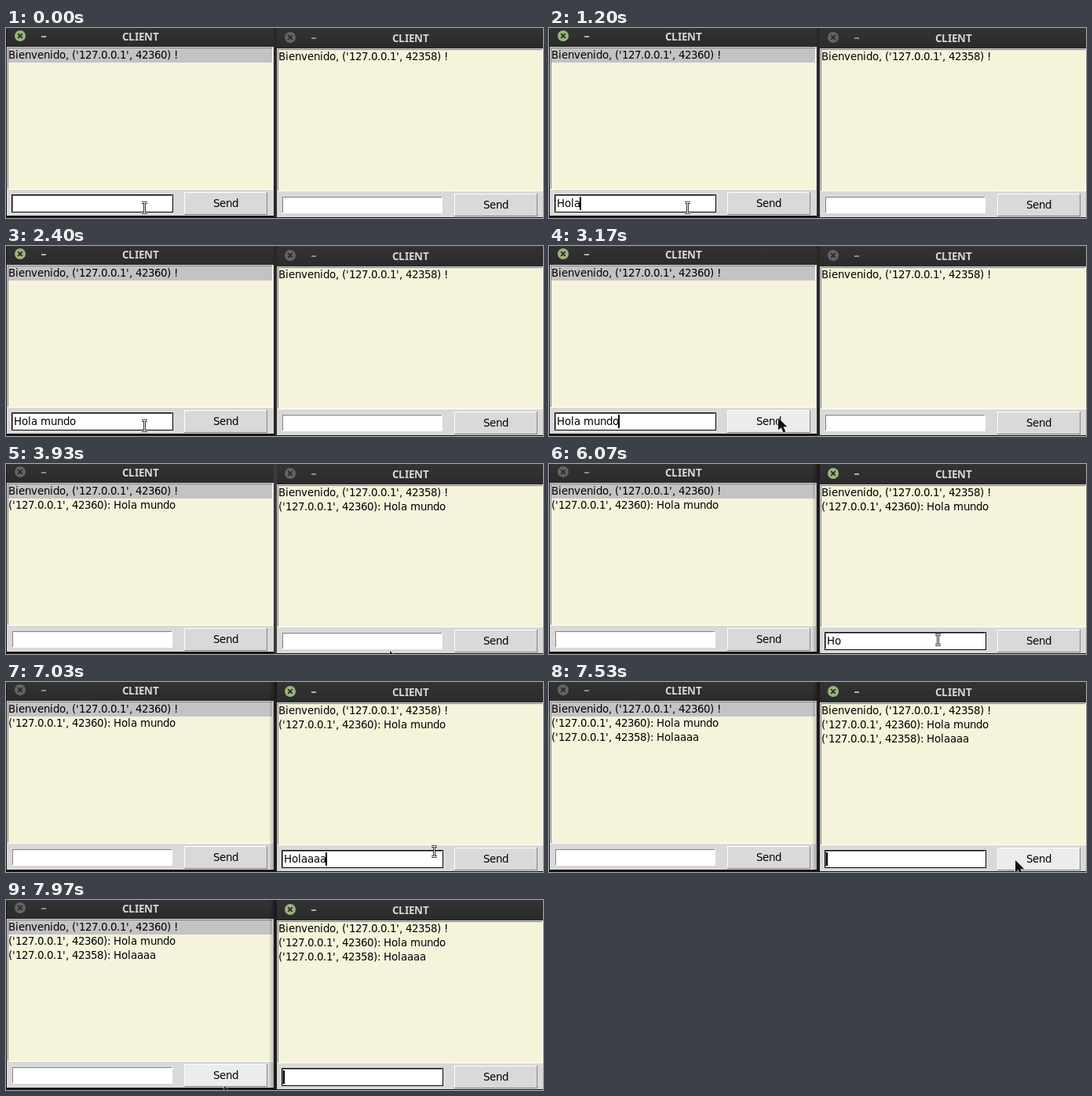
Write an HTML page that moves like this. It is 684 by 242 pixels and loops after 8 s.

```html
<!DOCTYPE html>
<html lang="es">
<head>
<meta charset="utf-8">
<title>Chat clients</title>
<style>
html, body { margin: 0; width: 100%; height: 100%; overflow: hidden; background: #161414; }
svg { display: block; }
text { font: 13.333px "DejaVu Sans", sans-serif; white-space: pre; fill: #000; }
.title { font: bold 13.333px "Noto Sans", sans-serif; fill: #d6d6d6; }
rect { shape-rendering: crispEdges; }
</style>
</head>
<body>
<svg id="stage" width="684" height="242" viewBox="0 0 684 242">
  <defs>
    <linearGradient id="bar" x1="0" y1="0" x2="0" y2="1">
      <stop offset="0" stop-color="#343434"/><stop offset="1" stop-color="#2b2b2b"/>
    </linearGradient>
    <linearGradient id="shade">
      <stop offset="0" stop-color="#000" stop-opacity="0"/><stop offset="1" stop-color="#000" stop-opacity=".4"/>
    </linearGradient>
  </defs>
</svg>
<script>
const LOOP = 8000;
const PLAIN = '13.333px "DejaVu Sans", sans-serif';
const BOLD = 'bold 13.333px "Noto Sans", sans-serif';
const FRAME = '#d9d9d9', DARK = '#828282', LIGHT = '#ffffff';
const ENTRY = [7, 212, 206, 23], BUTTON = [227, 209, 106, 29], LIST = [2, 25, 338, 181];

const stage = document.getElementById('stage');
const pen = document.createElement('canvas').getContext('2d');

function set(el, attrs) {
  for (const k in attrs) el.setAttribute(k, attrs[k]);
}
function add(parent, tag, attrs = {}) {
  const el = document.createElementNS('http://www.w3.org/2000/svg', tag);
  set(el, attrs);
  return parent.appendChild(el);
}
const box = (parent, [x, y, width, height], fill) => add(parent, 'rect', { x, y, width, height, fill });
const show = (el, on) => set(el, { visibility: on ? 'visible' : 'hidden' });
const inset = ([x, y, w, h], d = 1) => [x + d, y + d, w - 2 * d, h - 2 * d];
const inside = (px, py, [x, y, w, h]) => px >= x && px < x + w && py >= y && py < y + h;

// Whole-pixel advances, as the toolkit lays out its text
function steps(s, font) {
  pen.font = font;
  return [...s].map(ch => Math.round(pen.measureText(ch).width));
}
function write(el, s, x, font = PLAIN) {
  el.textContent = s;
  const xs = [x];
  for (const w of steps(s, font)) xs.push(x += w);
  set(el, { x: xs.slice(0, -1).join(' ') });
  return x;
}
function label(parent, s, x, y) {
  const el = add(parent, 'text', { y });
  write(el, s, x);
  return el;
}

// Panel with a two-tone edge; the returned function recolours it
function panel(parent, [x, y, w, h], fill) {
  const face = box(parent, [x, y, w, h], fill);
  const a = [box(parent, [x, y, w, 1]), box(parent, [x, y, 1, h])];
  const b = [box(parent, [x, y + h - 1, w, 1]), box(parent, [x + w - 1, y, 1, h])];
  return (fill, raised) => {
    set(face, { fill });
    a.forEach(r => set(r, { fill: raised ? LIGHT : DARK }));
    b.forEach(r => set(r, { fill: raised ? DARK : LIGHT }));
  };
}

function makeWindow(dx, dy, port, selected) {
  const g = add(stage, 'g', { transform: `translate(${dx} ${dy})` });
  box(g, [1, -4, 340, 28], 'url(#bar)');
  const close = add(g, 'circle', { cx: 18, cy: 10, r: 7 });
  add(g, 'path', { d: 'M15.2 7.2l5.6 5.6m0-5.6l-5.6 5.6', stroke: '#2b2b2b', 'stroke-width': 1.9 });
  const dash = box(g, [45, 10, 6, 2]);
  write(add(g, 'text', { class: 'title', y: 16 }), 'CLIENT', 148, BOLD);

  box(g, [1, 24, 340, 215], FRAME);
  panel(g, LIST)('#f5f3da', false);
  if (selected) box(g, [3, 26, 336, 18], '#c3c3c3');
  const lines = [
    `Bienvenido, ('127.0.0.1', ${port}) !`,
    "('127.0.0.1', 42360): Hola mundo",
    "('127.0.0.1', 42358): Holaaaa"
  ].map((s, i) => label(g, s, 3, 39 + 18 * i));

  const ring = box(g, ENTRY, '#000');
  panel(g, inset(ENTRY))('#fff', false);
  const typed = add(g, 'text', { y: 228 });
  const caret = box(g, [9, 215, 2, 17], '#000');

  const button = panel(g, BUTTON);
  const send = label(g, 'Send', 264, 228);

  return {
    over: (x, y, area) => inside(x - dx, y - dy, area),
    draw(s) {
      set(close, { fill: s.active ? '#9bb57c' : '#646464' });
      set(dash, { fill: s.active ? '#b0b0b0' : '#8c8c8c' });
      lines.forEach((el, i) => show(el, i <= s.count));
      show(ring, s.active);
      set(caret, { x: write(typed, s.text, 10) - 1 });
      show(caret, s.active && s.caret);
      button(s.hover ? '#ececec' : FRAME, !s.down);
      set(send, { transform: s.down ? 'translate(1 1)' : '' });
    }
  };
}

const gap = box(stage, [341, 0, 4, 242]);
const left = makeWindow(0, 0, 42360, true);
const shadow = box(stage, [335, 0, 10, 242], 'url(#shade)');
const right = makeWindow(344, 2, 42358, false);

const beam = add(stage, 'g');
for (const [stroke, width] of [['#000', 2.6], ['#fff', 1]]) {
  add(beam, 'path', { d: 'M-3-6.5H4M.5-6.5V6.5M-3 6.5H4', fill: 'none', stroke, 'stroke-width': width });
}
const arrow = add(stage, 'path', {
  d: 'M1 1V16.5L4.7 13.2 7.5 19.5 10.3 18.3 7.5 12.2H12.3Z',
  fill: '#111', stroke: '#fff', 'paint-order': 'stroke'
});

// Pointer glides: start, end, x, y
const glides = [
  [2430, 3170, 291, 218], [3700, 3930, 488, 237], [4270, 4430, 495, 224],
  [6700, 7030, 545, 216], [7130, 7270, 606, 226], [7470, 7970, 277, 236]
];
function pointer(t) {
  let x = 176, y = 229;
  for (const [from, to, gx, gy] of glides) {
    const k = Math.min(1, Math.max(0, (t - from) / (to - from)));
    const e = k * k * (3 - 2 * k);
    x += (gx - x) * e;
    y += (gy - y) * e;
  }
  return [Math.round(x), Math.round(y)];
}

// Keys come slowly at first, then faster
function typing(s, from, to, t) {
  const k = (t - from) / (to - from);
  if (k < 0) return '';
  return s.slice(0, 1 + Math.floor((s.length - 1) * Math.min(1, k) ** (1 / .65)));
}
const blink = t => t >= 0 && t % 880 < 570;
const within = (t, a, b) => t >= a && t < b;

function draw(t) {
  const [x, y] = pointer(t);
  const onLeft = t < 3830, onRight = t >= 4390;
  const count = (t >= 3470) + (t >= 7470);

  left.draw({
    active: onLeft, count,
    text: t < 3470 ? typing('Hola mundo', 400, 1830, t) : '',
    caret: blink(t - 70),
    hover: left.over(x, y, BUTTON),
    down: within(t, 3370, 3470)
  });
  right.draw({
    active: onRight, count,
    text: t < 7470 ? typing('Holaaaa', 5570, 6700, t) : '',
    caret: blink(t - 4390),
    hover: right.over(x, y, BUTTON),
    down: within(t, 7270, 7470)
  });
  set(gap, { fill: onLeft || onRight ? '#292826' : '#403b38' });
  show(shadow, onRight);

  const text = left.over(x, y, ENTRY) || right.over(x, y, ENTRY);
  show(beam, text);
  show(arrow, !text);
  set(text ? beam : arrow, { transform: `translate(${x} ${y})` });
}

const start = performance.now();
function tick() {
  draw((performance.now() - start) % LOOP);
  requestAnimationFrame(tick);
}
tick();
</script>
</body>
</html>
```
